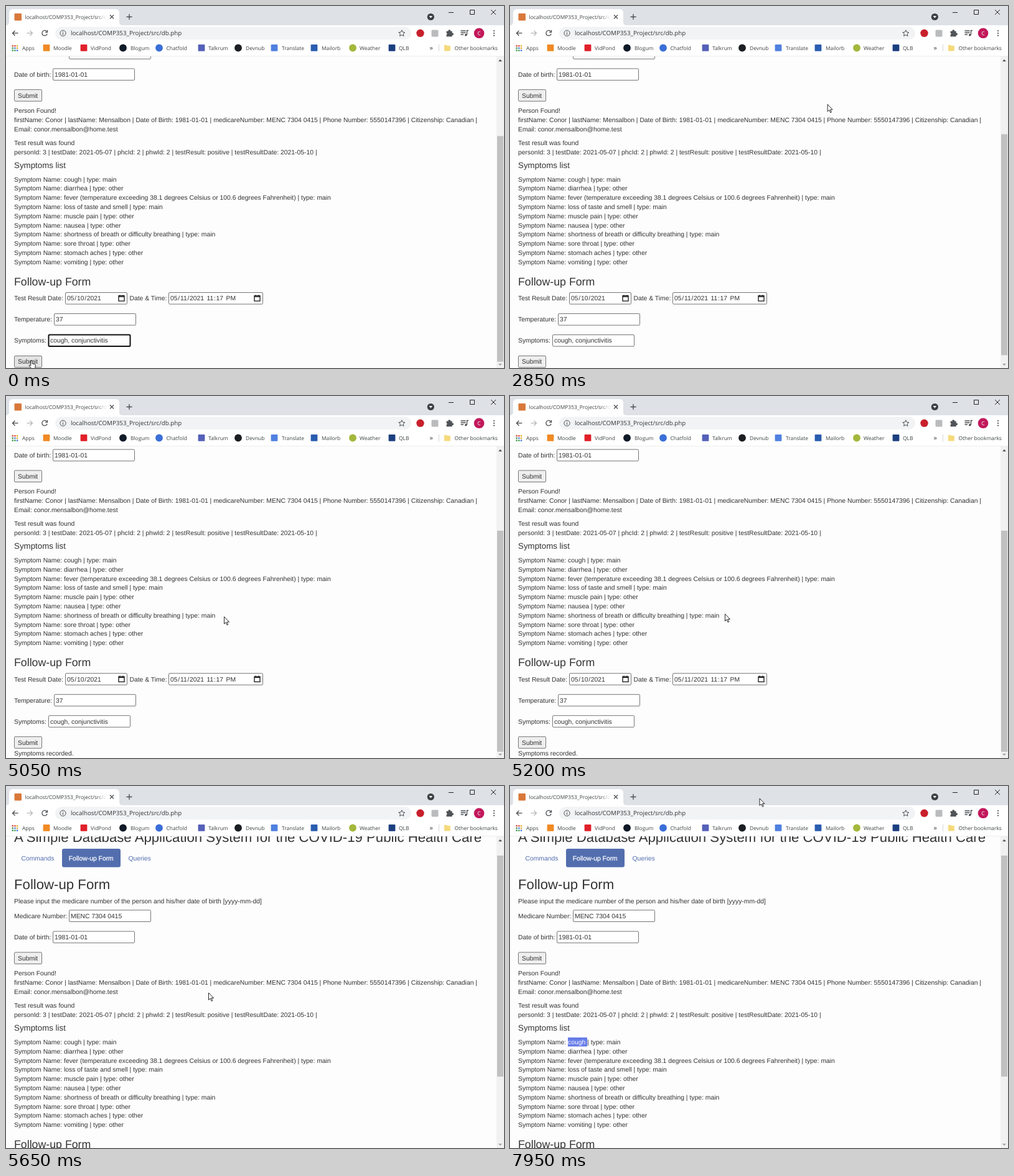
An HTML page that plays this animation: 800x583 px, repeating every 8 s.

```html
<!DOCTYPE html>
<html lang="en">
<head>
<meta charset="utf-8">
<title>Follow-up Form</title>
<style>
html, body { margin: 0; width: 100%; height: 100%; overflow: hidden; background: #fefdfe; }
svg { display: block; width: 800px; height: 583px; }
text { font: 10.36px "Liberation Sans", Arial, sans-serif; fill: #333; white-space: pre; text-rendering: geometricPrecision; }
.ui { font: 8.45px "Open Sans", "Noto Sans", sans-serif; fill: #3c4043; }
.ink { fill: none; stroke: #4a4d51; stroke-width: 1.3; }
#alert { filter: drop-shadow(0 1px 3px #0007); }
</style>
</head>
<body>
<svg id="stage" viewBox="0 0 800 583"></svg>
<script>
const text = (x, y, s, size, extra = '') =>
  `<text x="${x}" y="${y}" ${extra || (size ? `style="font-size:${size}px"` : '')}>${s}</text>`;
const ui = (x, y, s, style = '', extra = '') =>
  `<text class="ui" x="${x}" y="${y}" style="${style}" ${extra}>${s}</text>`;
const rect = (x, y, w, h, fill, extra = '') =>
  `<rect x="${x}" y="${y}" width="${w}" height="${h}" fill="${fill}" ${extra}/>`;
const disc = (x, y, r, fill) => `<circle cx="${x}" cy="${y}" r="${r}" fill="${fill}"/>`;
const line = (d, extra = '') => `<path class="ink" d="${d}" ${extra}/>`;

// ---- page content, laid out at scroll position 0 ----
const GRAY = 'stroke="#767676" rx="1.5"';
const field = (x, y, w, s, extra) =>
  rect(x + .5, y + .5, w - 1, 18.6, '#fff', GRAY) + text(x + 3, y + 13.5, s, 0, extra);
const button = (y, id) =>
  rect(13.5, y + .5, 44, 18.6, '#efefef', `${GRAY} id="${id}"`) + text(19, y + 13.5, 'Submit');
const calendar = (x, y) =>
  `<path d="M${x} ${y + 1.5}h9v8.5h-9zM${x + 2} ${y}v2M${x + 7} ${y}v2M${x} ${y + 3}h9" fill="none" stroke="#111" stroke-width="1.3"/>`;
// date parts carry a little padding on both sides
const pad = s => `dx="${[...s].map((c, i) => i && /\d/.test(c) != /\d/.test(s[i - 1]) || c == 'P' ? .74 : 0).join(' ')}"`;
const dateField = (x, w, s) => field(x, 594.2, w, s, pad(s)) + calendar(x + w - 14, 598.4);

const symptoms = [
  'cough | type: main', 'diarrhea | type: other',
  'fever (temperature exceeding 38.1 degrees Celsius or 100.6 degrees Fahrenheit) | type: main',
  'loss of taste and smell | type: main', 'muscle pain | type: other', 'nausea | type: other',
  'shortness of breath or difficulty breathing | type: main', 'sore throat | type: other',
  'stomach aches | type: other', 'vomiting | type: other'
];

const page =
  text(13, 89.5, 'A Simple Database Application System for the COVID-19 Public Health Care', 22.2) +
  rect(90, 101, 94, 29.8, '#536eae', 'rx="3"') +
  text(24.5, 119.7, 'Commands', 0, 'style="fill:#536eae"') +
  text(100.8, 119.7, 'Follow-up Form', 0, 'style="fill:#fff;stroke:#fff;stroke-width:.25"') +
  text(196.5, 119.7, 'Queries', 0, 'style="fill:#536eae"') +
  text(13, 166, 'Follow-up Form', 22.2) +
  text(13, 188.7, 'Please input the medicare number of the person and his/her date of birth [yyyy-mm-dd]') +
  text(13, 213.2, 'Medicare Number:') + field(101, 199.4, 132, 'MENC 7304 0415') +
  text(13, 247.2, 'Date of birth:') + field(75, 233.6, 132, '1981-01-01') +
  button(267.4, 'find') +
  text(13, 305.4, 'Person Found!') +
  text(13, 320.2, 'firstName: Conor | lastName: Mensalbon | Date of Birth: 1981-01-01 | medicareNumber: MENC 7304 0415 | Phone Number: 5550147396 | Citizenship: Canadian |') +
  text(13, 335, 'Email: conor.mensalbon@home.test') +
  text(13, 357.3, 'Test result was found') +
  text(13, 372.1, 'personId: 3 | testDate: 2021-05-07 | phcId: 2 | phwId: 2 | testResult: positive | testResultDate: 2021-05-10 |') +
  text(13, 394.4, 'Symptoms list', 13.32) +
  symptoms.map((s, i) => text(13, 415.9 + 14.8 * i, 'Symptom Name: ' + s)).join('') +
  `<g id="mark">${rect(93, 405, 31, 14.5, '#667ce8')}${text(93, 415.9, 'cough', 0, 'style="fill:#fff"')}</g>` +
  text(13, 583.2, 'Follow-up Form', 17.76) +
  text(13, 607.6, 'Test Result Date:') + dateField(95, 100, '05/10/2021') +
  text(198.5, 607.6, 'Date &amp; Time:') + dateField(261, 152, '05/11/2021 11:17 PM') +
  text(13, 641.6, 'Temperature:') + field(77, 628.2, 132, '37') +
  text(13, 675.6, 'Symptoms:') + field(68, 662.2, 132, 'cough, conjunctivitis') +
  rect(68.5, 662.7, 131, 18.6, 'none', 'id="focus" stroke="#101010" stroke-width="2" rx="1.5"') +
  button(696.2, 'send') +
  text(13, 726.6, 'Symptoms recorded.', 0, 'id="done"');

// ---- browser window ----
const bookmarks = [
  [76, 'Moodle', '#f08a24', 65], [136, 'VidPond', '#e0202a', 125], [200, 'Blogum', '#111a28', 188, 1],
  [257.5, 'Chatfold', '#3b6fd8', 246, 1], [325, 'Talkrum', '#5560b8', 314], [385, 'Devnub', '#1b1f23', 373, 1],
  [443, 'Translate', '#5080e0', 431], [507, 'Mailorb', '#2a5cb0', 495], [568, 'Weather', '#a3b83c', 557, 1],
  [631, 'QLB', '#1d3f80', 620]
];
const dots = ['#e04a3a', '#e04a3a', '#e9b030', '#3f9a50', '#4a7de0', '#e9b030', '#3f9a50', '#3f9a50', '#4a7de0'];

const chrome =
  rect(0, 0, 800, 31, '#dee1e6') + rect(0, 31, 800, 50, '#fff') +
  '<path d="M0 31q5 0 5-5V11q0-6 6-6H176q6 0 6 6v15q0 5 5 5z" fill="#fff"/>' +
  rect(13.5, 12, 11.5, 11.5, '#d9783a', 'rx="1"') +
  ui(30.5, 20.6, 'localhost/COMP353_Project/src/d') +
  rect(146, 9, 18, 16, 'url(#fade)') +
  line('M167 14.5l6 6m0-6l-6 6M193.5 17.5h9m-4.5-4.5v9') +
  disc(682.3, 17.5, 5.6, '#3c4043') + '<path d="M679.5 16h5.6l-2.8 3.4z" fill="#fff"/>' +
  line('M711 10.5h8M745.5 6.5h7v7h-7zM779 6l8 8m0-8l-8 8', 'style="stroke:#222;stroke-width:1"') +
  line('M19.5 43.7H10.5m4-4l-4 4 4 4') +
  line('M33.5 43.7h9m-4-4l4 4-4 4', 'style="stroke:#b4b7ba"') +
  line('M65.5 41.2a4.2 4.2 0 1 0 .6 3.6M66.5 39v3.3h-3.4') +
  rect(79, 33.5, 572, 20.6, '#f1f3f4', 'rx="10.3"') +
  '<circle class="ink" cx="91.5" cy="43.8" r="4.6" style="stroke-width:1"/>' +
  line('M91.5 43.2v3.2M91.5 41v1.2', 'style="stroke-width:1.1"') +
  ui(104, 47.3, 'localhost/COMP353_Project/src/db.php', 'font-size:9.78px;fill:#303236') +
  line('M635.8 38.8l1.5 3.3 3.6.4-2.7 2.4.8 3.5-3.2-1.8-3.2 1.8.8-3.5-2.7-2.4 3.6-.4z', 'style="stroke-width:1"') +
  disc(665.5, 43.8, 6.2, '#c7202c') + rect(683.5, 38.5, 11, 11, '#b9bbbd', 'rx="1.5"') +
  '<path d="M707.5 40.5h3a1.8 1.8 0 1 1 3.5 0h2.7v3a1.8 1.8 0 1 1 0 3.4v2.4h-9.2v-2.8a1.8 1.8 0 0 0 0-3.3z" fill="#505357"/>' +
  line('M730.5 40h8M730.5 43h8M730.5 46h4.5M740.5 39v7.5M740 39.5h3') +
  disc(738.7, 46.8, 1.8, '#4a4d51') +
  disc(760, 43.8, 8.3, '#c2185b') + ui(760, 47, 'C', 'fill:#fff', 'text-anchor="middle"') +
  [40, 43.8, 47.6].map(y => disc(784, y, 1.1, '#4a4d51')).join('') +
  dots.map((c, i) => rect(9.5 + i % 3 * 3.7, 63 + Math.floor(i / 3) * 3.7, 2.4, 2.4, c)).join('') +
  ui(26, 70.6, 'Apps') +
  bookmarks.map(([x, s, c, cx, round]) =>
    (round ? disc(cx, 67.5, 5.9, c) : rect(cx - 5.4, 62, 10.8, 10.8, c, 'rx="1"')) + ui(x, 70.6, s)).join('') +
  ui(680.5, 70.8, '»', 'font-size:11px') + rect(695, 61.5, 1, 12, '#d5d7da') +
  '<path d="M704 62.8h4l1.2 1.2h4.6v8.6H704z" fill="#f5da7c"/>' + ui(720.5, 70.6, 'Other bookmarks') +
  rect(0, 80.5, 800, .7, '#e3e4e6');

const scrollbar =
  rect(788, 81, 12, 502, '#f1f1f1') + rect(789, 0, 10, 0, '#c1c1c1', 'id="thumb"') +
  '<path d="M791 89.2h6l-3-3.2z" fill="#505050"/><path d="M791 576h6l-3 3.2z" fill="#a3a3a3"/>';

const dialog = '<g id="alert">' + rect(233.5, 54.5, 331.5, 97, '#fff', 'rx="3" stroke="#c4c4c8" stroke-width=".6"') +
  ui(245.5, 79.2, 'localhost says', 'font-size:10.37px;fill:#222') + ui(245.5, 99.8, 'Here', 'font-size:8.7px') +
  rect(505.5, 115, 47.5, 24, '#6577e2', 'rx="3"') +
  ui(529, 130, 'OK', 'fill:#fff;font-weight:700', 'text-anchor="middle"') + '</g>';

const cursors = '<g id="cursor" stroke="#111" stroke-width=".9" fill="#fff" stroke-linejoin="round">' +
  '<path id="arrow" d="M0 0V11.5L2.7 9.1 4.6 13.4 6.3 12.6 4.4 8.5H8Z"/>' +
  '<path id="hand" d="M-1.2.8q1.2-1.6 2.4 0v4.2l4 .9q1.4.4 1.2 2l-.8 4.6h-6l-3.6-4.6q.4-1.4 2-.4l.8.6z"/>' +
  '<path id="beam" fill="none" d="M-2-5.5q2 0 2 1.5 0-1.5 2-1.5M0-4.5v11M-2 7q2 0 2-1.5Q0 7 2 7"/></g>';

const $ = id => document.getElementById(id);
$('stage').innerHTML =
  '<defs><clipPath id="view"><path d="M0 81h788v502H0z"/></clipPath>' +
  '<linearGradient id="fade"><stop stop-color="#fff" stop-opacity="0"/><stop offset=".85" stop-color="#fff"/></linearGradient></defs>' +
  rect(0, 0, 800, 583, '#fefdfe') + `<g clip-path="url(#view)"><g id="page">${page}</g></g>` +
  scrollbar + chrome + dialog + cursors;

// ---- motion ----
const LOOP = 8000, ALERT = 400, OK = 2600, SELECT = 6450;
const scrollKeys = [[3500, 133.2], [3600, 148], [5286, 148], [5600, 0]];
const cursorKeys = [
  [1600, 41, 571], [2400, 526, 125], [2700, 526, 125], [3350, 410, 369], [4150, 410, 369], [4950, 350.5, 355.5],
  [5100, 350.5, 355.5], [5450, 325.5, 333], [5850, 325.5, 333], [6400, 102.5, 412], [6950, 102.5, 412],
  [7700, 300, 330], [7950, 401, 20]
];
const clamp = v => Math.max(0, Math.min(1, v));
const smooth = k => k * k * (3 - 2 * k);

function at(keys, t, col, ease = smooth) {
  let i = 0;
  while (i < keys.length - 2 && t > keys[i + 1][0]) i++;
  const a = keys[i], b = keys[i + 1];
  return a[col] + (b[col] - a[col]) * ease(clamp((t - a[0]) / (b[0] - a[0])));
}
const show = (id, on) => $(id).setAttribute('visibility', on ? 'visible' : 'hidden');

function draw(now) {
  const t = now % LOOP, grown = t >= OK;
  const scroll = at(scrollKeys, t, 1, k => k);
  $('page').setAttribute('transform', `translate(0 ${-scroll})`);
  $('thumb').setAttribute('y', grown ? 112 + .709 * scroll : 209.5);
  $('thumb').setAttribute('height', grown ? 356 : 363.5);

  $('alert').style.opacity = grown ? 0 : clamp((t - ALERT) / 150);
  $('send').setAttribute('fill', t < ALERT ? '#e3e3e3' : '#efefef');
  show('focus', t < ALERT - 100);
  show('done', grown);
  show('mark', t >= SELECT);

  const x = at(cursorKeys, t, 1), y = at(cursorKeys, t, 2);
  const hand = t <= 1650, beam = t > 6300 && t < 7050;
  $('cursor').setAttribute('transform', `translate(${x} ${y})`);
  show('hand', hand);
  show('beam', beam);
  show('arrow', !hand && !beam);
  requestAnimationFrame(() => draw(performance.now()));
}
draw(performance.now());
</script>
</body>
</html>
```
